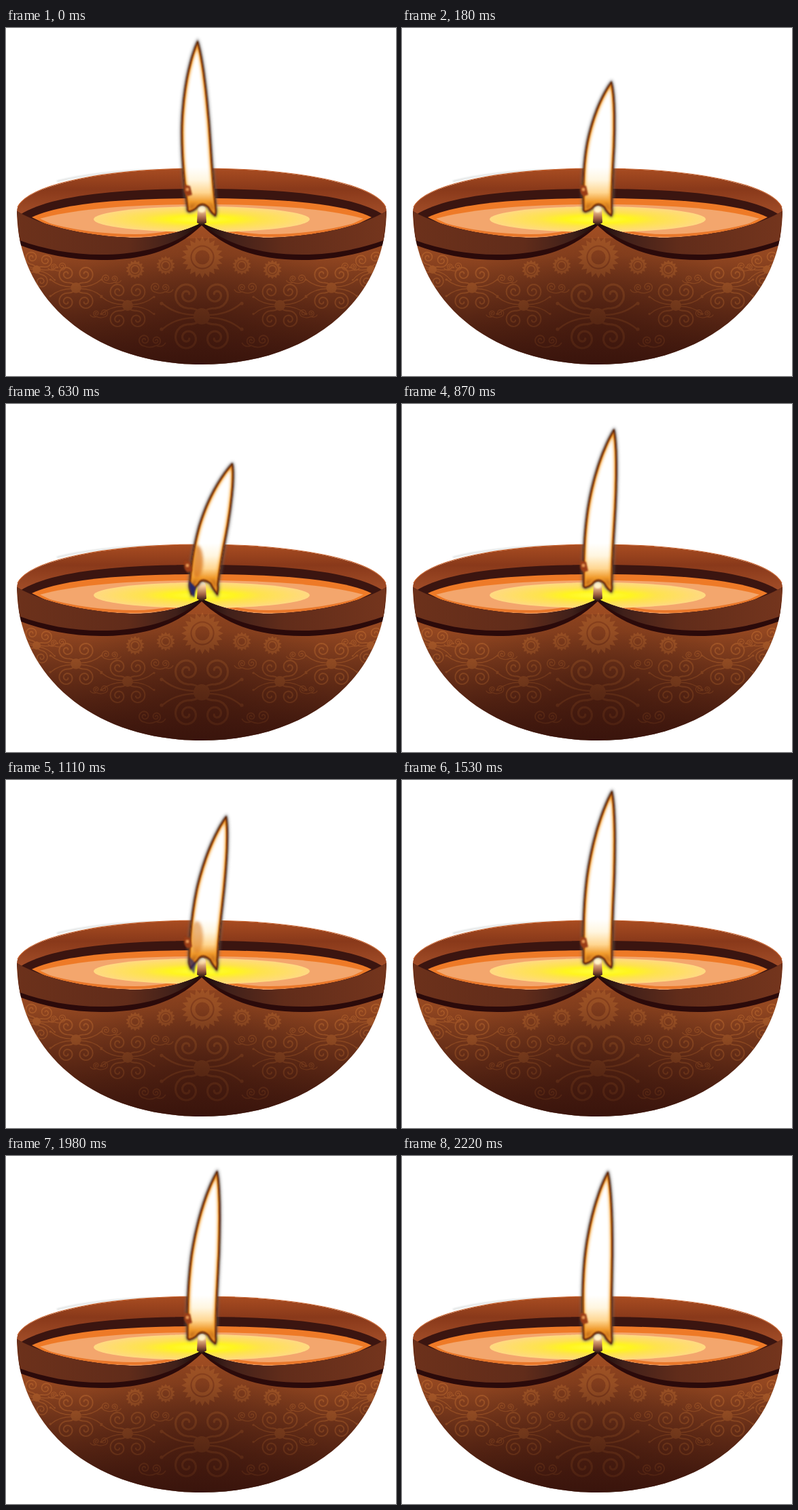
Write an HTML page that moves like this. It is 574 px wide and 513 px high and loops after 2.25 s.

```html
<!DOCTYPE html>
<html lang="en">
<head>
<meta charset="utf-8">
<title>Oil lamp</title>
<style>
html, body { margin: 0; width: 100%; height: 100%; overflow: hidden; background: #fff; }
svg { display: block; width: 574px; height: 513px; }
</style>
</head>
<body>
<svg viewBox="0 0 574 513" xmlns="http://www.w3.org/2000/svg">
  <defs>
    <linearGradient id="body" x1="0" y1="295" x2="0" y2="495" gradientUnits="userSpaceOnUse">
      <stop offset="0" stop-color="#a04d22"/><stop offset=".4" stop-color="#85401f"/><stop offset="1" stop-color="#5c2715"/>
    </linearGradient>
    <linearGradient id="dusk" x1="0" y1="335" x2="0" y2="495" gradientUnits="userSpaceOnUse">
      <stop offset="0" stop-color="#32100a" stop-opacity="0"/><stop offset="1" stop-color="#32100a" stop-opacity=".75"/>
    </linearGradient>
    <radialGradient id="shade" cx="288" cy="430" r="190" gradientUnits="userSpaceOnUse">
      <stop offset="0" stop-color="#32100a" stop-opacity=".38"/><stop offset="1" stop-color="#32100a" stop-opacity="0"/>
    </radialGradient>
    <linearGradient id="rim" x1="0" y1="207" x2="0" y2="275" gradientUnits="userSpaceOnUse">
      <stop offset="0" stop-color="#a84c21"/><stop offset=".45" stop-color="#89391a"/><stop offset="1" stop-color="#a24d28"/>
    </linearGradient>
    <linearGradient id="lip" x1="16" y1="0" x2="560" y2="0" gradientUnits="userSpaceOnUse">
      <stop offset="0" stop-color="#6c311b"/><stop offset=".3" stop-color="#612c1a"/>
      <stop offset=".43" stop-color="#40201a"/><stop offset=".5" stop-color="#180a0a"/>
      <stop offset=".57" stop-color="#40201a"/><stop offset=".72" stop-color="#612c1a"/><stop offset="1" stop-color="#74351d"/>
    </linearGradient>
    <radialGradient id="pool">
      <stop offset="0" stop-color="#ffff3c"/><stop offset=".3" stop-color="#fff51f"/>
      <stop offset=".55" stop-color="#fee34e"/><stop offset="1" stop-color="#ffd982"/>
    </radialGradient>
    <linearGradient id="wick" x1="0" y1="262" x2="0" y2="291" gradientUnits="userSpaceOnUse">
      <stop offset="0" stop-color="#fffbe0"/><stop offset=".25" stop-color="#f6c894"/>
      <stop offset=".65" stop-color="#a06043"/><stop offset="1" stop-color="#23100d"/>
    </linearGradient>
    <linearGradient id="fire" x1="0" y1="205" x2="0" y2="280" gradientUnits="userSpaceOnUse">
      <stop offset="0" stop-color="#fff"/><stop offset=".25" stop-color="#fff6e0"/>
      <stop offset=".5" stop-color="#ffd691"/><stop offset=".68" stop-color="#f09a2c"/>
      <stop offset=".84" stop-color="#a64d0c"/><stop offset="1" stop-color="#2f1823"/>
    </linearGradient>
    <filter id="soft" x="-30%" y="-30%" width="160%" height="160%"><feGaussianBlur stdDeviation="2.2"/></filter>
    <filter id="fine" x="-30%" y="-30%" width="160%" height="160%"><feGaussianBlur stdDeviation=".9"/></filter>
    <clipPath id="bowlClip"><path d="M16 270C17 404 132 496 288 496S559 404 560 270Z"/></clipPath>
    <clipPath id="flameClip"><path class="flame"/></clipPath>
  </defs>

  <path d="M75 226Q135 211 225 209M300 496Q350 491 395 478" fill="none" stroke="#cfd3d3" stroke-width="1.5" filter="url(#fine)"/>
  <ellipse cx="288" cy="270" rx="272" ry="63" fill="url(#rim)"/>
  <path d="M17 264C35 228 155 207 288 207S541 228 559 264" fill="none" stroke="#c55f2b" stroke-width="1.2"/>
  <path d="M21 275C68 245 175 237 288 237S508 245 555 275L480 312H96Z" fill="#3b1510"/>
  <path d="M38 279C82 258 175 251 288 251S494 258 538 279L470 312H106Z" fill="#ee7a27"/>
  <path d="M50 281C100 267 180 260 288 260S476 267 526 281L460 312H116Z" fill="#f3a66d"/>
  <path d="M60 289C110 303 160 306 190 306 228 306 266 297 288 286 310 297 348 306 386 306 416 306 466 303 516 289" fill="none" stroke="#e9782b" stroke-width="4"/>
  <ellipse cx="288" cy="282" rx="159" ry="19" fill="url(#pool)"/>

  <g clip-path="url(#bowlClip)">
    <path d="M16 270C66 300 151 309 190 309 228 309 266 299 288 288 310 299 348 309 386 309 425 309 510 300 560 270V500H16Z" fill="url(#body)"/>
    <g id="decor" fill="none" stroke="#b8662f" stroke-linecap="round" stroke-linejoin="round" opacity=".68"></g>
    <path d="M16 335H560V500H16Z" fill="url(#dusk)"/>
    <path d="M16 310H560V500H16Z" fill="url(#shade)"/>
    <path id="half" d="M16 270C66 300 151 309 190 309 228 309 266 299 288 287V291C255 323 210 342 140 342 95 342 55 333 20 320Z" fill="#2b0a0a"/>
    <use href="#half" transform="matrix(-1 0 0 1 576 0)"/>
    <path d="M16 270C66 300 151 309 190 309 228 309 266 299 288 287 310 299 348 309 386 309 425 309 510 300 560 270L556 313C520 326 480 334 436 334 370 334 320 317 288 288 256 317 206 334 140 334 96 334 56 326 20 313Z" fill="url(#lip)"/>
  </g>
  <path d="M282 267Q283 262 288 262T294 267L295 287 288 291 281 287Z" fill="url(#wick)"/>

  <path class="flame" fill="#555" stroke="#666" stroke-width="5" opacity=".6" filter="url(#soft)"/>
  <path class="flame" fill="url(#fire)"/>
  <g clip-path="url(#flameClip)">
    <ellipse id="ember" cx="281" cy="232" rx="9" ry="24" fill="#d8761c" filter="url(#soft)"/>
    <path class="flame" fill="none" stroke="#f5a02d" stroke-width="7" filter="url(#soft)"/>
    <path class="flame" fill="none" stroke="#b75a10" stroke-width="4" filter="url(#fine)"/>
  </g>
  <path class="flame" fill="none" stroke="#4f210c" stroke-width="2" filter="url(#fine)"/>
  <path id="blue" d="M270 261Q268 275 277 286L279 270Z" fill="#252766" filter="url(#fine)"/>
  <g filter="url(#fine)">
    <path d="M263 231Q260 243 267 248L274 246 271 233Z" fill="#9b3e13"/>
    <circle cx="267" cy="238" r="2.2" fill="#ef9a55"/>
  </g>
  <ellipse id="glow" cx="288" cy="268" rx="5" ry="4" fill="#fff3c8" filter="url(#fine)"/>
</svg>
<script>
const LOOP = 2250, STEP = 30, MID = 291;
const decor = document.getElementById('decor');
const flames = document.querySelectorAll('.flame');
const [blue, glow, ember] = ['blue', 'glow', 'ember'].map(id => document.getElementById(id));
const num = v => v.toFixed(1);
const clamp = v => Math.max(0, Math.min(1, v));
const line = pts => 'M' + pts.map(p => p.map(num).join(' ')).join('L');

function add(tag, attrs, parent = decor) {
  const el = document.createElementNS('http://www.w3.org/2000/svg', tag);
  for (const k in attrs) el.setAttribute(k, attrs[k]);
  return parent.appendChild(el);
}

const dot = (cx, cy, r, parent) => add('circle', { cx, cy, r, fill: '#b8662f', stroke: 'none' }, parent);

function spiral(cx, cy, r, sx, sy, turns = 1.7) {
  return line(Array.from({ length: 37 }, (_, i) => {
    const t = i / 36, a = Math.PI / 2 - t * turns * 2 * Math.PI, q = r * (1 - .86 * t);
    return [cx + sx * q * Math.cos(a), cy + sy * q * Math.sin(a)];
  }));
}

function motif(x, y, s, turn = 0) {
  const g = add('g', { transform: `translate(${x} ${y}) rotate(${turn}) scale(${s})` });
  let curls = '', arms = '';
  for (const sx of [-1, 1]) for (const sy of [-1, 1]) {
    curls += spiral(sx * 21, sy * 32, 20, sx, -sy) + `M${sx * 21} ${sy * 12}Q${sx * 8} ${sy * 12} ${sx * 3} ${sy * 6}`;
    arms += `M${sx * 9} ${sy * 2}Q${sx * 38} ${sy * 2} ${sx * 58} ${sy * 19}`;
    dot(sx * 59, sy * 19, 2.6, g);
  }
  add('path', { d: curls, 'stroke-width': 3.2 }, g);
  add('path', { d: arms, 'stroke-width': 2.4 }, g);
  dot(0, 0, 12, g);
}

function scroll(x, y, s, flip) {
  const d = spiral(-9, 0, 10, -1, 1) + spiral(10, 1, 8, 1, 1) + 'M-9 10Q0 14 10 9M10 9Q20 13 25 5';
  add('path', { d, 'stroke-width': 2, transform: `translate(${x} ${y}) scale(${s * flip} ${s})` });
}

function sun(x, y, r, rays) {
  const teeth = Array.from({ length: rays * 2 }, (_, i) => {
    const a = i * Math.PI / rays, q = i % 2 ? r * .76 : r;
    return [x + q * Math.sin(a), y - q * Math.cos(a)];
  });
  const q = r * .57;
  const hole = `M${x - q} ${y}a${q} ${q} 0 1 0 ${2 * q} 0a${q} ${q} 0 1 0 ${-2 * q} 0`;
  add('path', { d: line(teeth) + 'Z' + hole, fill: '#b8662f', 'fill-rule': 'evenodd', stroke: 'none' });
  add('circle', { cx: x, cy: y, r: r * .42, 'stroke-width': r * .16 });
}

sun(289, 338, 31, 20);
motif(288, 425, 1);
for (const side of [-1, 1]) {
  const at = dx => MID + side * dx;
  sun(at(56), 350, 14, 14);
  sun(at(101), 356, 14, 14);
  motif(at(112), 409, .66);
  motif(at(188), 383, .64);
  motif(at(246), 356, .5, side * -12);
  scroll(at(79), 460, .9, -side);
  scroll(at(64), 382, .75, -side);
  scroll(at(138), 369, .65, -side);
  scroll(at(152), 420, .6, side);
  scroll(at(214), 351, .6, side);
}

// time and place of the flame's tip
const tips = [
  [0, 282, 20], [390, 341, 155], [540, 351, 118], [630, 333, 88], [870, 312, 38],
  [1110, 324, 54], [1530, 309, 17], [1770, 317, 22], [2220, 303, 24], [LOOP, 282, 20]
];

function tipAt(t) {
  const i = tips.findLastIndex(p => p[0] <= t), a = tips[i], b = tips[i + 1];
  const u = (t - a[0]) / (b[0] - a[0]), k = u * u * (3 - 2 * u);
  return [1, 2].map(j => a[j] + (b[j] - a[j]) * k);
}

// a bowed spine with a half width along it; short flames are wide and blunt
function outline(x, y, low) {
  const foot = 288 + 3 * low, base = 266, squat = Math.max(0, y - 85);
  const wide = 23 + squat / 8, blunt = 3 + squat / 20;
  const left = [], right = [];
  for (let i = 0; i <= 40; i++) {
    const s = Math.sin(i / 40 * Math.PI / 2);
    const w = (21 + (wide - 21) * Math.min(1, 2 * s)) * (1 - s ** blunt) ** .85;
    const cx = foot + (x - foot) * s - 24 * s * (1 - s), cy = base + (y - base) * s;
    left.push([cx - w, cy]);
    right.unshift([cx + w, cy]);
  }
  const r = foot + 20, l = foot - 20;
  return line([...left, ...right])
    + `Q${r + 2} 274 ${r} ${277 + 4 * low}Q${r - 7} 272 ${r - 10} 265Q288 255 ${l + 12} 266`
    + `Q${l + 7} 270 ${l + 2} ${271 + 10 * low}Q${l - 2} 270 ${num(left[0][0])} ${base}Z`;
}

function draw(ms) {
  const t = Math.floor((ms % LOOP) / STEP) * STEP;
  const [x, y] = tipAt(t), low = clamp((x - 317) / 10);
  const d = outline(x, y, low);
  flames.forEach(f => f.setAttribute('d', d));
  blue.setAttribute('opacity', low);
  ember.setAttribute('opacity', .75 * low);
  glow.setAttribute('opacity', 1 - low);
}

let start;
function tick(now) {
  start ??= now;
  draw(now - start);
  requestAnimationFrame(tick);
}
draw(0);
requestAnimationFrame(tick);
</script>
</body>
</html>
```
